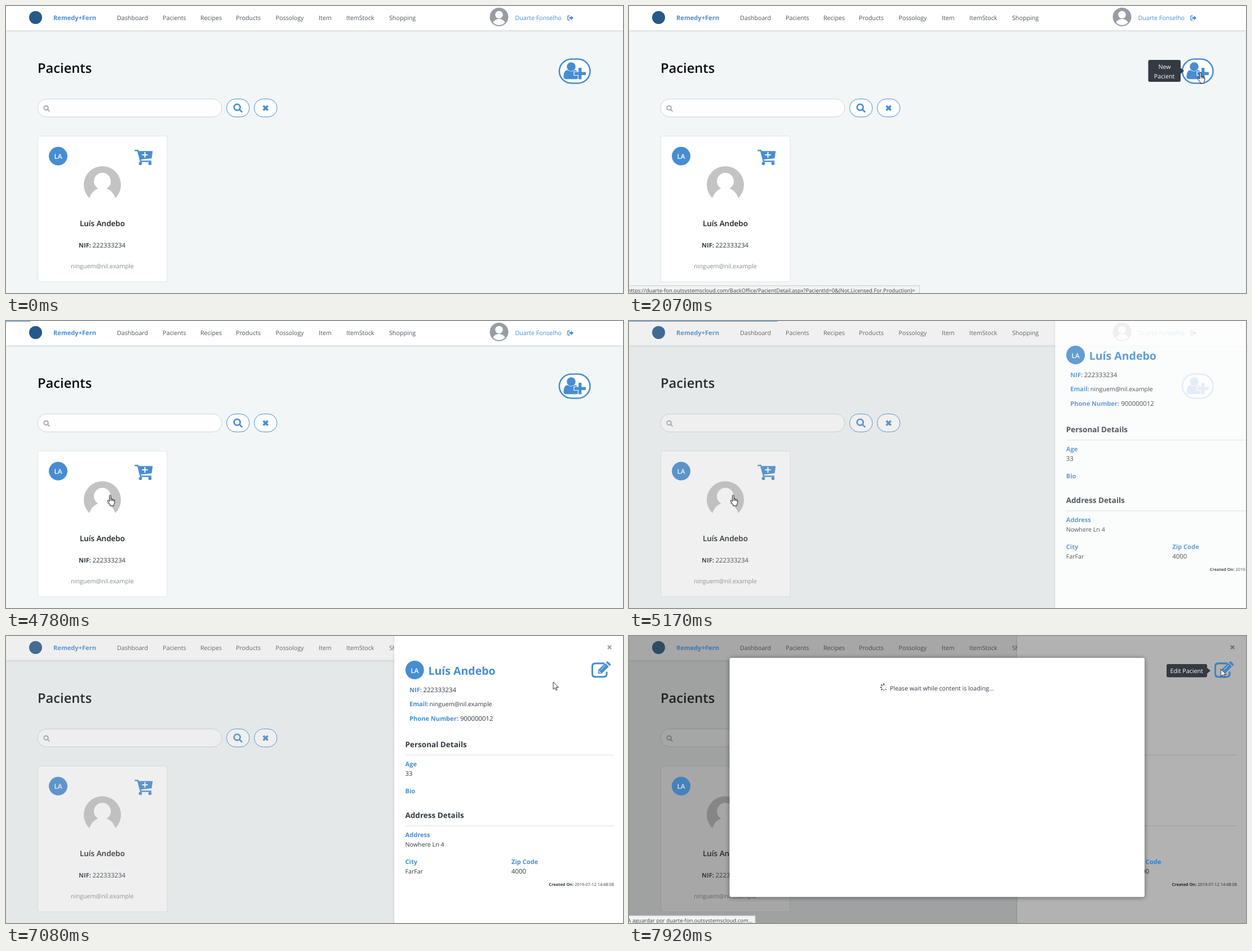
Animation of 1095 by 511 pixels, one loop 8 s. Source, as an HTML page:

```html
<!DOCTYPE html>
<html lang="en">
<head>
<meta charset="utf-8">
<title>Pacients</title>
<style>
html, body { margin: 0; width: 100%; height: 100%; overflow: hidden; background: #f2f6f7; }
svg { display: block; width: 100vw; height: 100vh; }
text { font: 10.7px "Open Sans", "Noto Sans", sans-serif; fill: #333a42; text-rendering: geometricPrecision; }
.nav text { fill: #4d535a; }
.nav text.link { fill: #478dd1; }
.mid { text-anchor: middle; }
.end { text-anchor: end; }
text.num { font-size: 11.4px; }
text.key { font-weight: 700; font-size: 11.1px; }
text.h1 { font-weight: 600; font-size: 23.7px; fill: #080a0c; }
text.h2 { font-weight: 700; font-size: 13.5px; }
text.name { font-weight: 600; font-size: 13.5px; fill: #15191d; }
text.big { font-weight: 700; font-size: 19.5px; }
text.mail { fill: #858b92; font-size: 10.75px; }
text.small { font-size: 7.4px; }
text.url { font-size: 9.45px; fill: #3c4043; }
text.blue, .blue { fill: #478dd1; }
text.white, .white { fill: #fff; }
text.initials { font-weight: 600; font-size: 11.8px; fill: #fff; }
.line { fill: none; stroke: #478dd1; }
.rule { stroke: #d9dde1; }
.dark { fill: #343a42; }
.button { fill: #fff; stroke: #478dd1; }
.status rect { fill: #f2f3f4; stroke: #c9cbcd; }

.anim { animation: 8s linear infinite both; }
.hard { animation-timing-function: step-end; }

#cursor { animation-name: travel; }
@keyframes travel {
  0%, 6% { transform: translate(985px, 405px); }
  8.625%, 11.5% { transform: translate(996px, 215px); }
  16.5% { transform: translate(1014px, 124px); }
  19.1%, 31% { transform: translate(1014px, 118px); animation-timing-function: ease-in-out; }
  40.4%, 41.25% { transform: translate(440px, 215px); }
  43.25%, 44.5% { transform: translate(244px, 271px); }
  49%, 65% { transform: translate(185px, 309.5px); animation-timing-function: ease-in-out; }
  68.5%, 74.25% { transform: translate(620px, 248.5px); animation-timing-function: ease-in-out; }
  80.75%, 84.6% { transform: translate(845px, 118px); animation-timing-function: ease-in-out; }
  91.5%, 100% { transform: translate(1050.5px, 59px); }
}
#arrow { animation-name: arrow; }
@keyframes arrow {
  0% { opacity: 0; } 6% { opacity: 1; } 15.5% { opacity: 0; } 32.5% { opacity: 1; }
  42.8% { opacity: 0; } 76.5% { opacity: 1; } 90.5% { opacity: 0; } 99%, 100% { opacity: 1; }
}
#hand { animation-name: hand; }
@keyframes hand {
  0% { opacity: 0; } 15.5% { opacity: 1; } 32.5% { opacity: 0; }
  42.8% { opacity: 1; } 76.5% { opacity: 0; } 90.5% { opacity: 1; } 99%, 100% { opacity: 0; }
}
#tipNew { animation-name: tipNew; }
@keyframes tipNew { 0%, 15.6% { opacity: 0; } 18.6%, 31.5% { opacity: 1; } 33.5%, 100% { opacity: 0; } }
#tipEdit { animation-name: tipEdit; }
@keyframes tipEdit { 0%, 90.5% { opacity: 0; } 93%, 100% { opacity: 1; } }
#statusNew { animation-name: statusNew; }
@keyframes statusNew { 0% { opacity: 0; } 15.5% { opacity: 1; } 32.5%, 100% { opacity: 0; } }
#statusEdit { animation-name: statusEdit; }
@keyframes statusEdit { 0% { opacity: 0; } 90.5% { opacity: 1; } 99%, 100% { opacity: 0; } }
#modal { animation-name: modal; }
@keyframes modal { 0% { opacity: 0; } 99%, 100% { opacity: 1; } }
#shade { animation-name: shade; }
@keyframes shade { 0%, 62% { opacity: 0; } 64.9%, 100% { opacity: 1; } }
#panel { animation-name: panel; }
@keyframes panel {
  0%, 62.35% { transform: translate(406px, 0); opacity: 0; animation-timing-function: cubic-bezier(.215, .61, .355, 1); }
  67.5%, 100% { transform: none; opacity: 1; }
}
#bar { animation-name: bar; }
@keyframes bar {
  0%, 22.1% { width: 0; }
  25.8% { width: 395px; }
  25.81%, 58.8% { width: 0; }
  64.6% { width: 262px; }
  66.5% { width: 340px; }
  66.51%, 100% { width: 0; }
}
</style>
</head>
<body>
<svg viewBox="0 0 1095 511" preserveAspectRatio="none">
  <defs>
    <filter id="soft" x="-10%" y="-10%" width="120%" height="130%"><feDropShadow dx="0" dy="1" stdDeviation="2" flood-opacity=".14"/></filter>
    <filter id="deep" x="-10%" y="-10%" width="120%" height="120%"><feDropShadow dx="0" dy="1" stdDeviation="4" flood-opacity=".45"/></filter>
    <clipPath id="face"><circle cx="875" cy="19.5" r="14.5"/></clipPath>
    <g id="lens" fill="none"><circle cx="-1.2" cy="-1.2" r="5"/><path d="M2.6 2.6 6.4 6.4" stroke-linecap="round"/></g>
    <path id="cross" d="M-4-4 4 4M4-4-4 4"/>
    <g id="badge"><circle class="blue" r="16.5"/><text class="initials mid" y="5">LA</text></g>
  </defs>

  <rect width="1095" height="511" fill="#f2f6f7"/>
  <rect width="1095" height="43" fill="#fff" filter="url(#soft)"/>

  <g class="nav">
    <circle cx="52.5" cy="20.5" r="11.5" fill="#24598a"/>
    <text id="brand" class="key link" x="84" y="25">Remedy+Fern</text>
    <text x="197" y="25">Dashboard</text>
    <text x="278" y="25">Pacients</text>
    <text x="345" y="25">Recipes</text>
    <text x="408" y="25">Products</text>
    <text x="478.5" y="25">Possology</text>
    <text x="555" y="25">Item</text>
    <text x="604" y="25">ItemStock</text>
    <text x="680" y="25">Shopping</text>
    <text class="link" x="903.5" y="25">Duarte Fonselho</text>
  </g>
  <circle cx="875" cy="19.5" r="16.5" fill="#969da4"/>
  <g class="white" clip-path="url(#face)"><circle cx="875" cy="15.5" r="6.8"/><ellipse cx="875" cy="33" rx="11.5" ry="10"/></g>
  <path class="line" stroke-width="1.4" d="M1000.5 17.5H997.7Q997 17.5 997 18.2V24.3Q997 25 997.7 25H1000.5"/>
  <path class="blue" d="M999.5 19.8h3.2v-2.6l4.3 4.1-4.3 4.1v-2.6h-3.2z"/>

  <text class="h1" x="56" y="119">Pacients</text>

  <rect class="button" x="982" y="94.5" width="54.5" height="43" rx="21.5" stroke-width="2.6"/>
  <g class="blue">
    <path d="M989.5 125.5q0-10.5 7-11.5 6.5 4.8 13 0 7 1 7 11.5 0 4.7-4.5 4.7h-18q-4.5 0-4.5-4.7z"/>
    <circle cx="1003" cy="108" r="7.8"/>
    <path d="M1015.5 109.5h6.5v7.5h7.5v6.5h-7.5v7.5h-6.5v-7.5h-7.5v-6.5h7.5z" stroke="#fff" stroke-width="1.2"/>
  </g>

  <rect x="56" y="165.5" width="327" height="32" rx="16" fill="#fefefe" stroke="#cdd3d8"/>
  <use href="#lens" transform="translate(72 182.3) scale(.75)" stroke="#a3a9af" stroke-width="2.6"/>
  <rect class="button" x="391.5" y="165.5" width="40.5" height="32" rx="16"/>
  <use href="#lens" transform="translate(411.5 181.5) scale(1.08)" stroke="#478dd1" stroke-width="2.5"/>
  <rect class="button" x="440.5" y="165.5" width="40.5" height="32" rx="16"/>
  <use href="#cross" transform="translate(460.7 181.8)" stroke="#478dd1" stroke-width="3.7"/>

  <rect x="56.5" y="231.5" width="229.5" height="259.5" rx="3" fill="#fff" stroke="#dfe4e7"/>
  <use id="cardBadge" href="#badge" x="92.5" y="267.3"/>
  <g>
    <path class="line" stroke-width="2.5" stroke-linejoin="round" d="M228.5 257.2H234L239 276.5H258"/>
    <path class="blue" d="M234 258.2h25.3q1 0 .9 1l-1.5 11q-.1 1-1.1 1.1L237.5 273.5z"/>
    <circle class="blue" cx="238.5" cy="280.3" r="2.9"/><circle class="blue" cx="255.5" cy="280.3" r="2.9"/>
    <path stroke="#fff" stroke-width="2" d="M246.5 260V270M241.5 265H251.5"/>
  </g>
  <circle cx="171" cy="318.3" r="33" fill="#c3c3c3"/>
  <circle class="white" cx="171" cy="312" r="15"/>
  <path class="white" d="M148 342C153 328 162 324 171 324S189 328 194 342V353H148z"/>
  <text class="name mid" x="171" y="391.5">Luís Andebo</text>
  <text class="key" x="129" y="430">NIF:</text>
  <text class="num" x="153.5" y="430">222333234</text>
  <text class="mail mid" x="171" y="467">ninguem@nil.example</text>

  <g id="tipNew" class="anim">
    <rect class="dark" x="921.5" y="96" width="57.5" height="39" rx="3"/>
    <path class="dark" d="M978 109.5 985 115.5 978 121.5z"/>
    <text class="white mid" x="950.5" y="112">New</text>
    <text class="white mid" x="950" y="128.7">Pacient</text>
  </g>

  <rect id="shade" class="anim" width="1095" height="511" fill="rgba(179,179,179,.21)"/>
  <rect id="bar" class="anim blue" height="1"/>

  <g id="panel" class="anim">
    <rect x="689" y="-6" width="412" height="523" fill="#fff" filter="url(#soft)"/>
    <use href="#cross" transform="translate(1071 20) scale(.75)" stroke="#9a9fa6" stroke-width="3"/>
    <use href="#badge" x="725.3" y="60.5"/>
    <text class="big blue" x="749.5" y="69">Luís Andebo</text>
    <g id="edit">
      <path class="line" stroke-width="3" d="M1062 48.7H1046Q1040.5 48.7 1040.5 54V67.5Q1040.5 72.8 1046 72.8H1060.5Q1066 72.8 1066 67.5V63.5"/>
      <path class="blue" d="M1051 67v-6.5l12.5-12.3 6.2 6.2L1057.2 67zM1064.8 47l1.2-1.2q1.3-1 2.6 0l4 4q1 1.3 0 2.6l-1.3 1.2z"/>
      <path stroke="#fff" d="M1055.5 60.5 1064 52M1053 61.5v3.5h3.5" fill="none"/>
    </g>
    <text class="key blue" x="716" y="100">NIF:</text><text class="num" x="740.5" y="100">222333234</text>
    <text class="key blue" x="716" y="125.3">Email:</text><text x="751.5" y="125.3">ninguem@nil.example</text>
    <text class="key blue" x="716" y="150.5">Phone Number:</text><text class="num" x="806" y="150.5">900000012</text>
    <text class="h2" x="708.5" y="198">Personal Details</text>
    <path class="rule" d="M709 212H1079M709 338H1079"/>
    <text class="key blue" x="708.5" y="232">Age</text><text class="num" x="708.5" y="249.3">33</text>
    <text class="key blue" x="708.5" y="279.5">Bio</text>
    <text class="h2" x="708.5" y="324">Address Details</text>
    <text class="key blue" x="708.5" y="358">Address</text><text x="708.5" y="375.3">Nowhere Ln 4</text>
    <text class="key blue" x="708.5" y="405.5">City</text><text x="708.5" y="423">FarFar</text>
    <text id="zip" class="key blue" x="897" y="405.5">Zip Code</text><text class="num" x="897" y="423">4000</text>
    <text class="small end" x="1079" y="445"><tspan font-weight="700">Created On:</tspan> 2019-07-12 14:48:08</text>
  </g>

  <g id="statusNew" class="anim hard status">
    <rect x="-2" y="498" width="517.5" height="15"/>
    <text class="url" x="-2.5" y="509.8">https://duarte-fon.outsystemscloud.com/BackOffice/PacientDetail.aspx?PacientId=0&amp;(Not.Licensed.For.Production)=</text>
  </g>
  <g id="statusEdit" class="anim hard status">
    <rect x="-2" y="498" width="516.5" height="15"/>
    <text class="url" x="-2.5" y="509.8">https://duarte-fon.outsystemscloud.com/BackOffice/PacientDetail.aspx?PacientId=1&amp;(Not.Licensed.For.Production)=</text>
  </g>

  <g id="modal" class="anim hard">
    <rect width="1095" height="511" fill="rgba(0,0,0,.3)"/>
    <g class="nav"><use href="#brand" opacity=".7"/></g>
    <use href="#cardBadge" opacity=".7"/>
    <use href="#edit" opacity=".8"/>
    <use href="#zip"/>
    <rect x="178.5" y="39" width="736.5" height="425.5" rx="3" fill="#fff" filter="url(#deep)"/>
    <g fill="none" stroke-width="1.7">
      <path stroke="#222" d="M452.3 87.5V84.5M449.5 88.7 447.5 86.5M448.5 91.3H446.2M449.5 94 447.8 95.8"/>
      <path stroke="#888" d="M452.3 95V97.5M455 94 456.8 95.8"/>
      <path stroke="#ddd" d="M456 91.3H458.3M455 88.7 457 86.5"/>
    </g>
    <text x="463" y="97">Please wait while content is loading...</text>
    <g class="status">
      <rect x="-2" y="498" width="226" height="15"/>
      <text class="url" x="-2.5" y="509.8">A aguardar por duarte-fon.outsystemscloud.com...</text>
    </g>
  </g>

  <g id="tipEdit" class="anim">
    <rect class="dark" x="954" y="50" width="72" height="23.5" rx="3"/>
    <path class="dark" d="M1025 56 1032 61.8 1025 67.5z"/>
    <text class="white mid" x="989.7" y="66">Edit Pacient</text>
  </g>

  <g id="cursor" class="anim" fill="#fff" stroke="#111" stroke-linejoin="round">
    <path id="arrow" class="anim hard" stroke-width=".9" d="M0 0V13l3-2.8 2 4.6 2-.9-2-4.4h4.2z"/>
    <path id="hand" class="anim hard" d="M-1.5 12V1.8Q-1.5.4-.2.4T1.1 1.8V7q2.5-.5 2.6 1 2.1-.4 2.3 1.1 1.8-.2 1.8 1.5v3.7l-1.4 3v2.2H-.2v-2L-4.7 11.6q-.8-1.6.6-1.9 1.2 0 2.6 2.3M1.1 7v4M3.7 8v3M6 9v2.5"/>
  </g>
</svg>
</body>
</html>
```
